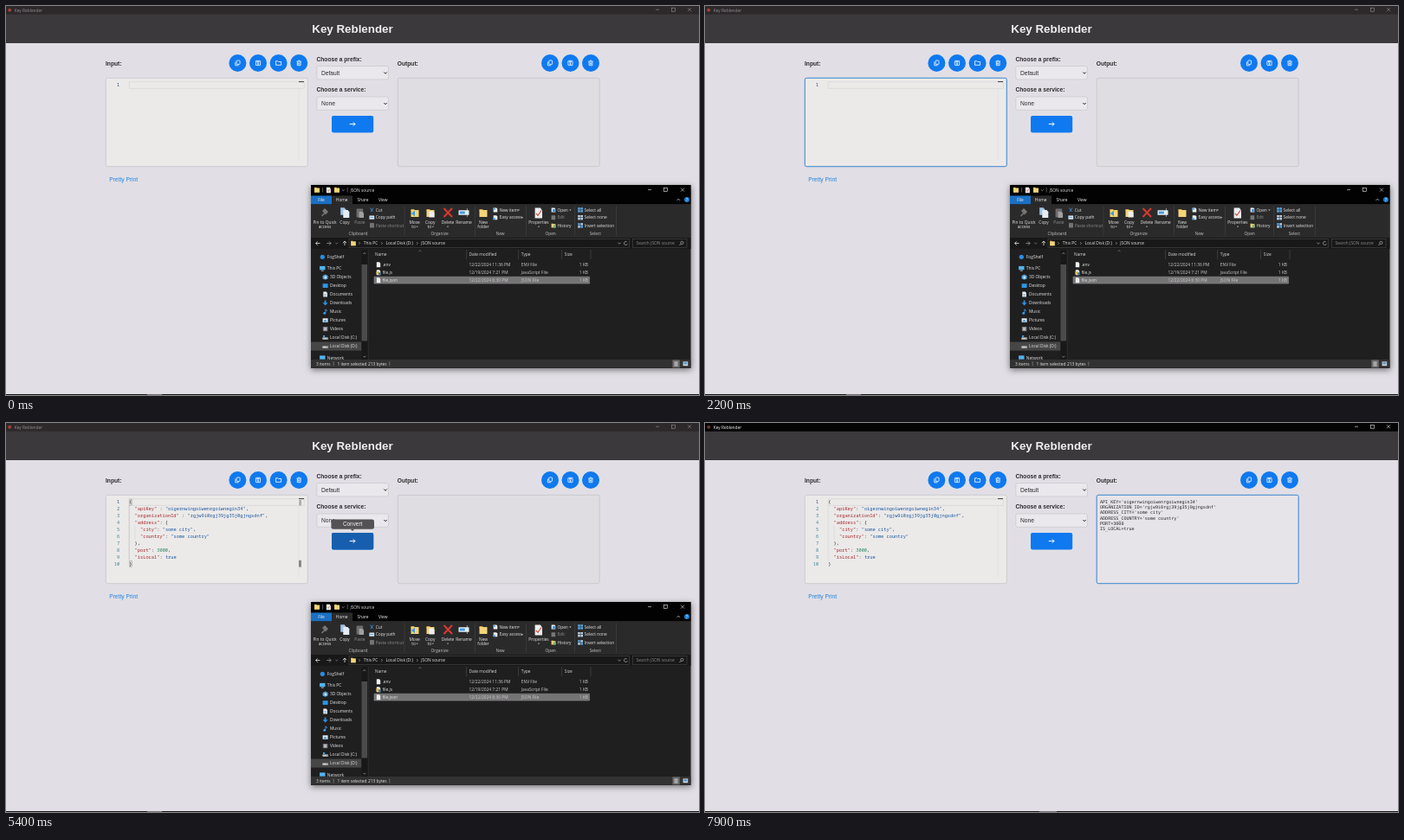
These frames come from a looping animation (800 by 450 pixels, 8000 ms). An HTML page with a canvas:

```html
<!DOCTYPE html>
<html lang="en">
<head>
<meta charset="utf-8">
<title>Key Reblender</title>
<style>
html, body { margin: 0; width: 100%; height: 100%; overflow: hidden; background: #e1dfe5; }
canvas { display: block; width: 800px; height: 450px; }
</style>
</head>
<body>
<canvas id="stage"></canvas>
<script>
const LOOP = 8000;
const canvas = document.getElementById('stage');
const dpr = window.devicePixelRatio || 1;
canvas.width = 800 * dpr;
canvas.height = 450 * dpr;
const c = canvas.getContext('2d');

const ARIAL = '"Liberation Sans", Arial, sans-serif';
const UI = '"Open Sans", "Noto Sans", sans-serif';
const MONO = '"Noto Sans Mono", "DejaVu Sans Mono", monospace';
const APP = 'Key Reblender';
const BLUE = '#0f79ef', DARK_BLUE = '#175eae';

const clamp = v => Math.max(0, Math.min(1, v));
const ramp = (t, a, b) => clamp((t - a) / (b - a));
const ease = v => v * v * (3 - 2 * v);

function rect(x, y, w, h, fill) {
  c.fillStyle = fill;
  c.fillRect(x, y, w, h);
}
function round(x, y, w, h, r, fill, line, lw = .6) {
  c.beginPath();
  c.roundRect(x, y, w, h, r);
  if (fill) { c.fillStyle = fill; c.fill(); }
  if (line) { c.strokeStyle = line; c.lineWidth = lw; c.stroke(); }
}
function disc(x, y, r, fill) {
  c.beginPath();
  c.arc(x, y, r, 0, 7);
  c.fillStyle = fill;
  c.fill();
}
// Each argument after the width is one polyline: x, y, x, y ...
function lines(color, lw, ...paths) {
  c.beginPath();
  for (const p of paths)
    for (let i = 0; i < p.length; i += 2)
      i ? c.lineTo(p[i], p[i + 1]) : c.moveTo(p[i], p[i + 1]);
  c.strokeStyle = color;
  c.lineWidth = lw;
  c.stroke();
}
function poly(fill, ...p) {
  c.beginPath();
  for (let i = 0; i < p.length; i += 2) c.lineTo(p[i], p[i + 1]);
  c.closePath();
  c.fillStyle = fill;
  c.fill();
}
function text(s, x, y, font, color, align = 'left') {
  c.font = font;
  c.fillStyle = color;
  c.textAlign = align;
  c.textBaseline = 'alphabetic';
  c.fillText(s, x, y);
}
const arial = (s, x, y, color = '#2c2a2d', weight = '', align = 'left', size = 6.67) =>
  text(s, x, y + size * .35, `${weight} ${size}px ${ARIAL}`, color, align);
const ui = (s, x, y, color = '#e6e6e6', align = 'left', size = 4.85) =>
  text(s, x, y + size * .35, `${size}px ${UI}`, color, align);
const chevron = (x, y, dx, dy, color, lw = .6) =>
  dy ? lines(color, lw, [x - dx, y - dy / 2, x, y + dy / 2, x + dx, y - dy / 2])
     : lines(color, lw, [x - dx / 2, y - dx, x + dx / 2, y, x - dx / 2, y + dx]);

function winButtons(xs, y, color) {
  const [a, b, d] = xs;
  lines(color, .6, [a - 2, y, a + 2, y], [d - 2, y - 2, d + 2, y + 2], [d + 2, y - 2, d - 2, y + 2]);
  c.strokeRect(b - 2, y - 2, 4, 4);
}

/* ---------- converter page ---------- */
const glyphs = {
  copy(x, y) {
    round(x - 1.2, y - 3, 3.8, 4.4, .6, null, '#fff', .8);
    lines('#fff', .8, [x - 2.6, y - 1.5, x - 2.6, y + 2.8, x + 1.2, y + 2.8]);
  },
  save(x, y) {
    round(x - 2.6, y - 2.6, 5.2, 5.2, .5, null, '#fff', .8);
    rect(x - 1.5, y - 1.8, 2.8, 1.2, '#fff');
    disc(x, y + .9, .9, '#fff');
  },
  folder(x, y) {
    lines('#fff', .8, [x - 3, y + 2.3, x - 3, y - 2.3, x - .8, y - 2.3, x, y - 1.5, x + 3, y - 1.5, x + 3, y + 2.3, x - 3.3, y + 2.3]);
  },
  trash(x, y) {
    lines('#fff', .8, [x - 2.6, y - 2, x + 2.6, y - 2], [x - 1, y - 2.8, x + 1, y - 2.8],
      [x - 1.9, y - 2, x - 1.9, y + 2.7, x + 1.9, y + 2.7, x + 1.9, y - 2],
      [x - .6, y - .6, x - .6, y + 1.6], [x + .6, y - .6, x + .6, y + 1.6]);
  }
};
function roundButton(x, kind) {
  disc(x, 66, 10, BLUE);
  glyphs[kind](x, 66);
}
function select(label, y) {
  round(358.8, y, 82.6, 15.4, 2, '#eae8ec', '#c4c2c7');
  arial(label, 364, y + 7.7);
  chevron(438, y + 7.9, 1.7, 1.8, '#222', 1);
}

const KEY = '#a5262a', STR = '#1c56a0', NUM = '#2a8561', PLAIN = '#2b2b2e';
function source(tidy) {
  const gap = tidy ? ': ' : ' : ';
  return [
    [['{', PLAIN]],
    [['  "apiKey"', KEY], [gap, PLAIN], ['"oigernwingoiwenrgoiwnegin34"', STR], [',', PLAIN]],
    [['  "organizationId"', KEY], [gap, PLAIN], ['"rgjw9i0rgj39jg35j0gjngsdnf"', STR], [',', PLAIN]],
    [['  "address"', KEY], [': {', PLAIN]],
    [['    "city"', KEY], [': ', PLAIN], ['"some city"', STR], [',', PLAIN]],
    [['    "country"', KEY], [': ', PLAIN], ['"some country"', STR]],
    [['  },', PLAIN]],
    [['  "port"', KEY], [': ', PLAIN], ['3000', NUM], [',', PLAIN]],
    [['  "isLocal"', KEY], [': ', PLAIN], ['true', STR]],
    [['}', PLAIN]]
  ];
}
const OUTPUT = [
  "API_KEY='oigernwingoiwenrgoiwnegin34'",
  "ORGANIZATION_ID='rgjw9i0rgj39jg35j0gjngsdnf'",
  "ADDRESS_CITY='some city'",
  "ADDRESS_COUNTRY='some country'",
  'PORT=3000',
  'IS_LOCAL=true'
];

function box(x, fill, glow) {
  round(x, 83.3, 233, 102.4, 2, fill, '#c3c1c6', .7);
  if (glow > 0) {
    c.globalAlpha = glow;
    round(x, 83.3, 233, 102.4, 2, null, '#2f86d6', .9);
    c.globalAlpha = 1;
  }
}

function editor(t, loaded, done) {
  const step = 7.917, top = 91.5, left = 142.2, font = `5.345px ${MONO}`;
  const glow = Math.max(0, ramp(t, 1850, 2000) - ramp(t, 4400, 4650));
  box(115.3, '#ebeae9', glow);
  c.strokeStyle = '#d9d8d8';
  c.lineWidth = .8;
  c.strokeRect(left, 87.8, 202, 7.5);
  lines('#dddcdd', .6, [338, 96, 338, 179]);
  rect(338, 87, 6, 1.1, '#4b4a4c');
  if (!loaded) {
    text('1', 131.2, top + 1.9, font, '#28407c', 'right');
    return;
  }
  if (!done) {
    rect(338.3, 89, 2.6, 6.5, '#a9a8aa');
    rect(338, 158.8, 2.9, 7.8, '#858487');
    for (const y of [88, 159.2]) {
      rect(left, y, 3.4, 7.2, '#d5d8d4');
      c.strokeStyle = '#aaa';
      c.lineWidth = .5;
      c.strokeRect(left, y, 3.4, 7.2);
    }
  }
  lines(done ? '#d0cfd2' : '#a5a4a7', .5, [left, 95.5, left, 158.5]);
  lines('#cfced0', .5, [149, 119.3, 149, 135]);
  source(done).forEach((row, i) => {
    const y = top + i * step + 1.9;
    text(String(i + 1), 131.2, y, font, i ? '#3d7f98' : '#28407c', 'right');
    let col = 0;
    for (const [s, color] of row) {
      text(s, left + col * 3.207, y, font, color);
      col += s.length;
    }
  });
  if (!done && Math.floor((t + 500) / 500) % 2 === 0 && t < 6300)
    rect(left - .2, 88, 1, 7.3, '#111');
}

function page(t) {
  const loaded = t >= 2400, done = t >= 6450;
  rect(0, 0, 800, 450, '#e1dfe5');
  rect(0, 0, 800, 43, '#3b393b');
  rect(0, 0, 800, 9.7, done ? '#040404' : '#2d292b');
  disc(4.2, 4.8, 2, done ? '#6e3230' : '#a33f3a');
  ui(APP, 9.7, 5, done ? '#f2f2f2' : '#918d8f');
  winButtons([752, 770.5, 789], 4.2, done ? '#eee' : '#969294');
  arial(APP, 400, 26.2, '#f0eef0', 'bold', 'center', 13.33);

  arial('Input:', 115, 66.2, undefined, 'bold');
  arial('Output:', 451.8, 66.2, undefined, 'bold');
  arial('Choose a prefix:', 358.5, 61.2, undefined, 'bold');
  arial('Choose a service:', 358.5, 96.8, undefined, 'bold');
  ['copy', 'save', 'folder', 'trash'].forEach((k, i) => roundButton(267.4 + i * 23.6, k));
  ['copy', 'save', 'trash'].forEach((k, i) => roundButton(628 + i * 23.5, k));
  select('Default', 69.5);
  select('None', 105);

  editor(t, loaded, done);
  box(452.2, done ? '#e6e4e8' : '#dfdde1', ramp(t, 7500, 7650));
  if (done)
    OUTPUT.forEach((s, i) => text(s, 456, 92.8 + i * 6.27, `5.075px "DejaVu Sans Mono", monospace`, '#29282b'));
  arial('Pretty Print', 119.2, 200.2, '#2484e0');

  const hover = ramp(t, 4900, 5100) - ramp(t, 7300, 7500);
  round(376, 127, 48.2, 19.4, 2, BLUE);
  c.globalAlpha = hover;
  round(376, 127, 48.2, 19.4, 2, DARK_BLUE);
  round(375.4, 111.4, 49.6, 11.4, 2.4, '#545254');
  poly('#545254', 397.8, 122.7, 402.2, 122.7, 400, 125);
  arial('Convert', 400.1, 117.2, '#f2f2f2', '', 'center', 6.4);
  c.globalAlpha = 1;
  lines('#fff', 1, [396.7, 136.6, 403, 136.6], [400.8, 134.4, 403, 136.6, 400.8, 138.8]);

  rect(0, 449, 800, 1, '#171617');
  rect(done ? 386 : 163, 449, done ? 20 : 17, 1, '#6f6d70');
}

/* ---------- file window ---------- */
function folder(x, y, s = 1) {
  rect(x - 3 * s, y - 3 * s, 2.6 * s, 1.5 * s, '#d6a93f');
  rect(x - 3 * s, y - 2.3 * s, 6 * s, 5.3 * s, '#f3d477');
}
function sheet(x, y, w, h, fill = '#eceef0') {
  poly(fill, x - w / 2, y - h / 2, x + w / 4, y - h / 2, x + w / 2, y - h / 4, x + w / 2, y + h / 2, x - w / 2, y + h / 2);
}
const GREY = '#8f8f8f', SKY = '#3f9be0';

function ribbon() {
  const big = (s, x, y = 250, color) => ui(s, x, y, color, 'center');
  // clipboard
  lines('#767676', 1.6, [364.5, 243, 368, 239.5]);
  poly('#767676', 365, 237, 368, 234, 372, 238, 369, 241.5);
  big('Pin to Quick', 368); big('access', 368, 255.2);
  sheet(389.2, 237.4, 6, 8.5, '#9fc3e4');
  sheet(392.8, 240.4, 7, 9, '#e4edf5');
  big('Copy', 391);
  round(404.6, 234.5, 7.6, 10, .6, '#6c6c6c');
  sheet(410.3, 241.5, 5.5, 7, '#a0a0a0');
  big('Paste', 408.4, 250, GREY);
  lines(SKY, .8, [420.5, 233.5, 423.6, 238], [424, 233.5, 421, 238]);
  ui('Cut', 426.7, 236);
  round(419.4, 242.4, 5.8, 4.4, .4, '#d9e4ee');
  rect(420.2, 244, 4, .8, SKY);
  ui('Copy path', 426.7, 244.8);
  round(420, 251, 5, 5.4, .4, '#747474');
  ui('Paste shortcut', 426.7, 254, GREY);
  // organize
  for (const x of [472, 490]) {
    folder(x, 239.5, 1.5);
  }
  poly(SKY, 468, 240, 472, 236.5, 472, 243.5);
  sheet(491.5, 241, 6, 7);
  lines('#d8392f', 2, [505.5, 234, 515, 244], [515, 234, 505.5, 244]);
  round(522.5, 236.2, 12, 5.6, .6, '#e6eef5');
  rect(523.8, 237.6, 6, 2.8, SKY);
  lines('#ddd', .6, [532.4, 234, 532.4, 244]);
  big('Move', 471.6); big('to', 470.5, 255.2);
  big('Copy', 489.7); big('to', 488.8, 255.2);
  big('Delete', 510); big('Rename', 528.5);
  // new
  folder(551, 239.5, 1.5);
  big('New', 551); big('folder', 551, 255.2);
  sheet(565, 236, 4.6, 5.2); rect(562, 234.3, 3, 1.4, SKY);
  sheet(565, 244.7, 4.6, 5); rect(562, 245.2, 3, 1.6, SKY);
  ui('New item', 569.6, 236); ui('Easy access', 569.6, 244.8);
  // open
  sheet(614.8, 239.5, 8.4, 12);
  lines('#d14c3a', 1.2, [612, 240, 614, 242.3, 618, 236.5]);
  big('Properties', 615);
  sheet(632, 236, 4.6, 5.2); rect(631, 235, 3, 3, SKY);
  round(629.6, 242.3, 4.6, 5, .4, '#777');
  folder(632, 254, .8); disc(633.3, 255, 1.7, '#6fb27b');
  ui('Open', 636.4, 236); ui('Edit', 636.4, 244.8, GREY); ui('History', 636.4, 254);
  // select
  ['Select all', 'Select none', 'Invert selection'].forEach((s, i) => {
    const y = [236, 244.8, 254][i];
    for (let k = 0; k < 4; k++) {
      const on = i === 0 || (i === 2 && k % 3 === 0);
      rect(660.2 + (k % 2) * 3.2, y - 2.8 + (k >> 1) * 3, 2.6, 2.4, on ? '#55a9ea' : '#bcd3e6');
    }
    ui(s, 667.6, y);
  });
  for (const [x, y] of [[474.6, 255.2], [492.8, 255.2], [510, 255.2], [591.8, 236], [596, 244.8], [615, 255.2], [651.4, 236]])
    poly('#ccc', x - 1.2, y - .5, x + 1.2, y - .5, x, y + .9);
  for (const x of [460, 541.5, 600.5, 656.5, 704.5]) lines('#4a494a', .5, [x, 231.5, x, 265.5]);
  for (const [s, x] of [['Clipboard', 406.4], ['Organize', 500.6], ['New', 570.5], ['Open', 628.6], ['Select', 680.3]])
    ui(s, x, 263.5, '#c4c4c4', 'center');
}

function addressBar() {
  lines('#e6e6e6', .8, [362.5, 274.5, 357.6, 274.5], [359.8, 272.3, 357.6, 274.5, 359.8, 276.7],
    [391, 277, 391, 272], [388.8, 274.2, 391, 272, 393.2, 274.2]);
  lines('#999', .8, [370.3, 274.5, 375.2, 274.5], [373, 272.3, 375.2, 274.5, 373, 276.7]);
  chevron(381.7, 274.5, 1.4, 1.6, '#999');
  c.strokeStyle = '#4a4a4a';
  c.lineWidth = .6;
  c.strokeRect(396, 269.4, 323.4, 10.2);
  c.strokeRect(723.6, 269.4, 62.4, 10.2);
  folder(401, 274.5, .95);
  for (const x of [408, 433.8, 474.8]) chevron(x, 274.5, 1.3, 0, '#ccc');
  ui('This PC', 412.8, 274.5);
  ui('Local Disk (D:)', 438.4, 274.5);
  ui('JSON source', 479.2, 274.5);
  chevron(708, 274.5, 1.6, 1.7, '#ccc');
  c.beginPath();
  c.arc(715.5, 274.5, 2, .3, 5.4);
  c.stroke();
  ui('Search JSON source', 727.6, 274.5, '#8c8c8c');
  c.strokeStyle = '#ccc';
  c.beginPath();
  c.arc(780.4, 273.9, 1.6, 0, 7);
  c.stroke();
  lines('#ccc', .7, [779.2, 275.2, 777.4, 277]);
}

function sidebar() {
  rect(352, 388.6, 58.5, 10, '#474647');
  rect(410.5, 282, 6.6, 127, '#191819');
  rect(410.5, 299, 6.6, 88.5, '#4c4b4c');
  chevron(413.8, 286.2, 1.5, -1.6, '#bbb');
  chevron(413.8, 405.6, 1.5, 1.6, '#bbb');
  lines('#343334', .5, [418.5, 282, 418.5, 409]);
  disc(365.3, 290.3, 2.6, '#2b8de0');
  ui('FogShelf', 370.8, 290.2);
  const screen = (x, y) => {
    rect(x - 3.2, y - 2.6, 6.4, 4.3, '#51b4ee');
    rect(x - 1.5, y + 2.2, 3, .8, '#cfdbe4');
  };
  screen(365.3, 303.5);
  ui('This PC', 370.8, 303.5);
  const names = ['3D Objects', 'Desktop', 'Documents', 'Downloads', 'Music', 'Pictures', 'Videos', 'Local Disk (C:)', 'Local Disk (D:)'];
  names.forEach((s, i) => {
    const x = 368.6, y = 313.6 + i * 10;
    ui(s, 374, y);
    if (i === 0) { poly('#5aa4d8', x - 3, y - 1.6, x, y - 3, x + 3, y - 1.6, x + 3, y + 1.8, x, y + 3.2, x - 3, y + 1.8); rect(x - 1, y - .8, 2.4, 2.4, '#d5e8f4'); }
    if (i === 1) rect(x - 3, y - 2.4, 6, 4.8, '#2f95e2');
    if (i === 2) { sheet(x, y, 4.6, 6); lines('#4b8cc0', .6, [x - 1.3, y, x + 1.3, y], [x - 1.3, y + 1.5, x + 1.3, y + 1.5]); }
    if (i === 3) { rect(x - .9, y - 3, 1.8, 3, '#2e94e8'); poly('#2e94e8', x - 3, y - .3, x + 3, y - .3, x, y + 3); }
    if (i === 4) { disc(x - .9, y + 1.8, 1.4, '#3ca0ec'); lines('#3ca0ec', .9, [x + .3, y + 1.8, x + .3, y - 2.8, x + 2.4, y - .8]); }
    if (i === 5) { rect(x - 3, y - 2.3, 6, 4.6, '#dde8ee'); poly('#3d8fc4', x - 2.4, y + 1.7, x - .3, y - .8, x + 2.4, y + 1.7); }
    if (i === 6) { rect(x - 2.8, y - 2.6, 5.6, 5.2, '#77757a'); rect(x - 1.6, y - 1.8, 3.2, 3.6, '#bcb9c0'); }
    if (i > 6) { rect(x - 3.2, y - .2, 6.4, 2.4, '#c6c8ca'); rect(x + 1.4, y + .6, 1, .8, '#3a9a55'); }
    if (i === 7) rect(x - 2.6, y - 2.6, 2.2, 1.9, '#38a4ec');
  });
  c.save();
  c.beginPath();
  c.rect(352, 400, 58, 9);
  c.clip();
  screen(365.3, 407);
  ui('Network', 370.8, 407);
  c.restore();
}

function fileList() {
  const cols = [426, 534.4, 594.8, 644.8];
  ['Name', 'Date modified', 'Type', 'Size'].forEach((s, i) => ui(s, cols[i], 287.6, '#d8d8d8'));
  for (const x of [531.6, 591.6, 641.6, 675]) lines('#585758', .5, [x, 282, x, 293]);
  chevron(478, 283.2, 1.5, -1.4, '#aaa', .5);
  round(425, 313.2, 248.6, 7.9, 0, '#757475', '#9a999a', .5);
  const files = [
    ['.env', '12/22/2024 11:36 PM', 'ENV File'],
    ['file.js', '12/19/2024 7:21 PM', 'JavaScript File'],
    ['file.json', '12/22/2024 8:30 PM', 'JSON File']
  ];
  files.forEach(([name, date, type], i) => {
    const y = 299.2 + i * 9;
    sheet(430, y, 4.4, 6);
    if (i === 1) { rect(427.4, y - 1, 3.2, 3.2, '#e2b944'); rect(430, y + .2, 2.6, 2.4, '#3d77a8'); }
    ui(name, 434.5, y);
    ui(date, cols[1], y, '#cfcfcf');
    ui(type, cols[2], y, '#cfcfcf');
    ui('1 KB', 672, y, '#cfcfcf', 'right');
  });
}

function explorer() {
  c.save();
  c.shadowColor = 'rgba(0,0,0,.5)';
  c.shadowBlur = 7 * dpr;
  c.shadowOffsetY = 2 * dpr;
  rect(352, 207, 438.5, 212, '#201f20');
  c.restore();
  rect(352, 207, 438.5, 22.4, '#020202');
  rect(352, 229.2, 438.5, 39, '#2b2a2b');
  rect(352, 268, 438.5, 13, '#191819');
  rect(352, 409, 438.5, 9.6, '#333233');
  folder(359, 212.8);
  sheet(372.4, 213, 5, 6.4);
  lines('#c94b3b', .7, [371, 213.2, 372, 214.5, 374, 211.5]);
  folder(382, 212.8);
  lines('#aaa', .5, [365.6, 210, 365.6, 215.6], [394.2, 210, 394.2, 215.6]);
  chevron(389.3, 213, 1.4, 1.4, '#ccc');
  ui('JSON source', 397.4, 213);
  winButtons([743, 761.5, 781], 212.6, '#eee');
  rect(352, 219.4, 24, 9.8, '#1b70c3');
  rect(376, 219.4, 24, 9.8, '#2b2a2b');
  [['File', 364], ['Home', 387.7], ['Share', 412], ['View', 435.2]].forEach(([s, x]) => ui(s, x, 224.3, '#f0f0f0', 'center'));
  chevron(776.3, 224, 1.8, -1.8, '#ddd', .7);
  disc(786, 224, 3, '#1f7fd6');
  ui('?', 786, 224, '#fff', 'center');
  ribbon();
  addressBar();
  sidebar();
  fileList();
  ui('3 items', 358, 414);
  ui('1 item selected', 382.4, 414);
  ui('213 bytes', 418, 414);
  lines('#aaa', .5, [378.2, 411.4, 378.2, 416.4], [442.8, 411.4, 442.8, 416.4]);
  rect(769.4, 409.4, 8.4, 9, '#6a696a');
  for (let i = 0; i < 3; i++) rect(771.4, 411.6 + i * 1.9, 4.2, 1, '#ddd');
  rect(781.6, 411.4, 5.6, 4.8, '#dcdcdc');
  rect(782.4, 412.2, 4, 2.4, '#4c9bd2');
}

function dragGhost(t) {
  if (t < 350 || t >= 1850) return;
  const k = ease(ramp(t, 300, 900)), m = ease(ramp(t, 950, 1600));
  const x = 440 - 126 * k - 84 * m, y = 317 - 90 * k - 92 * m;
  c.save();
  c.translate(x, y);
  c.globalAlpha = .85;
  const g = c.createLinearGradient(0, -22, 0, 22);
  g.addColorStop(0, 'rgba(205,220,234,.55)');
  g.addColorStop(1, 'rgba(176,207,235,.95)');
  rect(-21, -22, 43, 43, g);
  poly('#e4e6ea', -13, -19, 7, -19, 13.5, -12.5, 13.5, 17, -13, 17);
  lines('#c4cbd3', .5, [-13, -19, 7, -19, 13.5, -12.5, 13.5, 17, -13, 17, -13, -19], [7, -19, 7, -12.5, 13.5, -12.5]);
  c.globalAlpha = 1;
  if (x < 352) {
    round(4.6, 21, 22.6, 8.2, .4, '#eef0f3', '#8e9197', .5);
    lines('#2367b4', 1.1, [6.4, 25.1, 10.4, 25.1], [8.4, 23.1, 8.4, 27.1]);
    ui('Copy', 12.6, 25.1, '#2b4b85');
  }
  c.restore();
}

function draw(now) {
  const t = now % LOOP;
  c.setTransform(dpr, 0, 0, dpr, 0, 0);
  page(t);
  if (t < 6450) explorer();
  dragGhost(t);
  requestAnimationFrame(draw);
}
requestAnimationFrame(draw);
</script>
</body>
</html>
```
